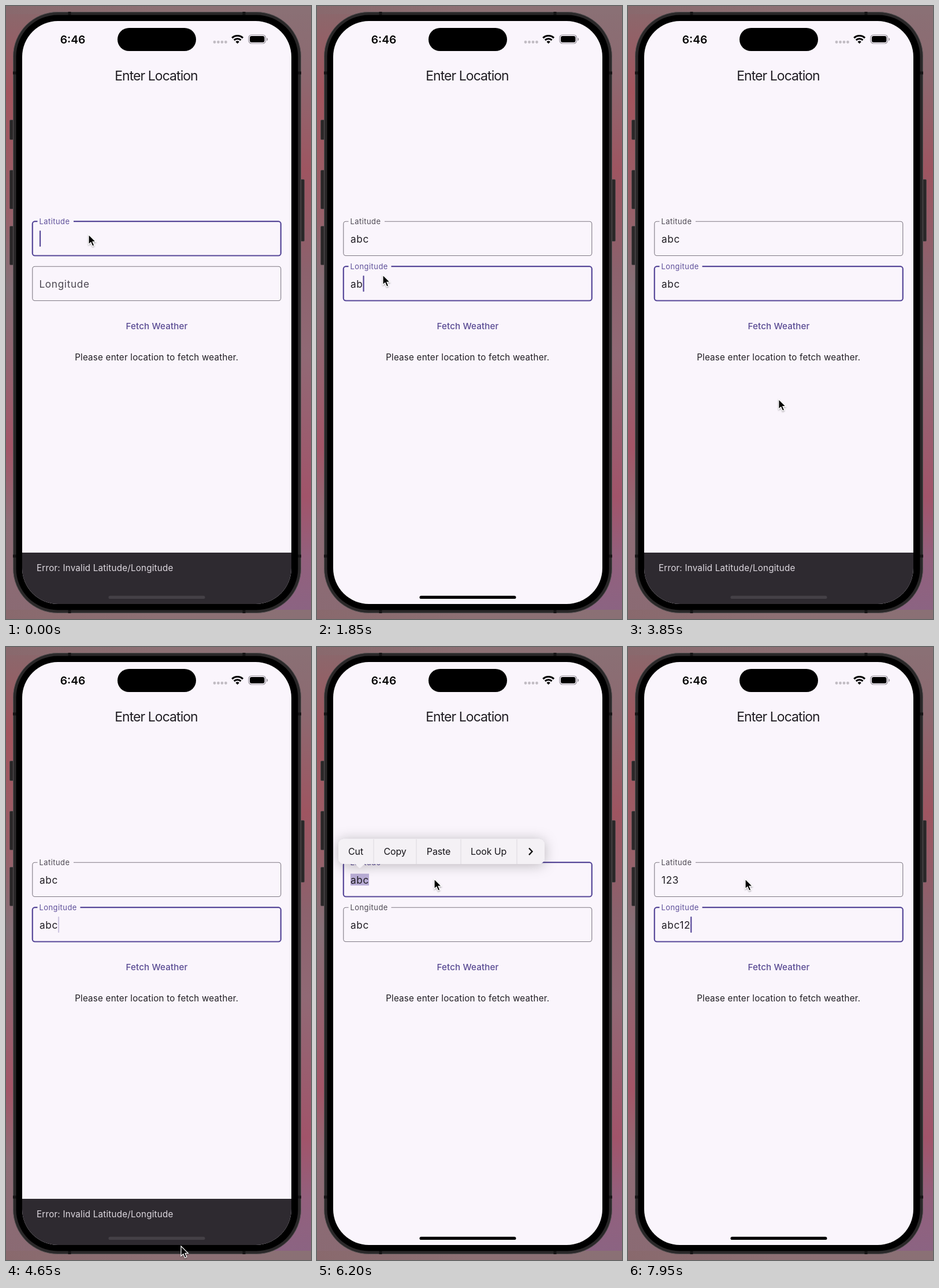
These frames come from a looping animation (528x1062 px, 8 s). An HTML page:

```html
<!DOCTYPE html>
<html lang="en">
<head>
<meta charset="utf-8">
<style>
  html, body { margin: 0; width: 100%; height: 100%; overflow: hidden; }
  svg { display: block; width: 528px; height: 1062px; }
  text { font: 15.2px Inter, "Open Sans", sans-serif; font-optical-sizing: none; letter-spacing: .2px; fill: #201d23; }
  .mid { text-anchor: middle; }
  .field text { font-size: 17.3px; letter-spacing: .6px; }
  #menu text { font-size: 16px; letter-spacing: -.15px; fill: #151318; text-anchor: middle; }
</style>
</head>
<body>
<svg viewBox="0 0 528 1062">
  <defs>
    <linearGradient id="wallLeft" x2="0" y2="1">
      <stop stop-color="#89696d"/><stop offset=".14" stop-color="#a2545d"/>
      <stop offset=".33" stop-color="#985f68"/><stop offset=".46" stop-color="#857077"/>
      <stop offset=".72" stop-color="#a35567"/><stop offset=".84" stop-color="#8e6d76"/>
      <stop offset="1" stop-color="#8a6a73"/>
    </linearGradient>
    <linearGradient id="wallRight" x2="0" y2="1">
      <stop stop-color="#8a7075"/><stop offset=".1" stop-color="#8c6a71"/>
      <stop offset=".27" stop-color="#9e5561"/><stop offset=".43" stop-color="#8c626d"/>
      <stop offset=".57" stop-color="#916975"/><stop offset=".8" stop-color="#a1546a"/>
      <stop offset=".9" stop-color="#93607d"/><stop offset="1" stop-color="#8a6483"/>
    </linearGradient>
    <linearGradient id="wallTop">
      <stop stop-color="#89696d"/><stop offset=".5" stop-color="#8d7074"/><stop offset="1" stop-color="#8a7075"/>
    </linearGradient>
    <clipPath id="screen"><rect x="28" y="26" width="466" height="1010" rx="62"/></clipPath>
    <filter id="menuShadow" x="-20%" y="-80%" width="140%" height="260%">
      <feDropShadow dx="0" dy="2" stdDeviation="11" flood-opacity=".26"/>
    </filter>
    <filter id="mouseShadow" x="-50%" y="-50%" width="200%" height="200%">
      <feDropShadow dx="0" dy="1.5" stdDeviation="1.2" flood-opacity=".35"/>
    </filter>
  </defs>

  <rect width="264" height="1062" fill="url(#wallLeft)"/>
  <rect x="264" width="264" height="1062" fill="url(#wallRight)"/>
  <rect width="528" height="14" fill="url(#wallTop)"/>
  <rect y="1046" width="528" height="16" fill="url(#wallTop)"/>

  <g fill="#2a2728" stroke="#4b4648" stroke-width=".8">
    <rect x="6.5" y="197.5" width="8" height="34" rx="1.5"/>
    <rect x="6.5" y="284.5" width="8" height="67" rx="1.5"/>
    <rect x="6.5" y="381.5" width="8" height="67" rx="1.5"/>
    <rect x="508" y="300.5" width="8.5" height="107" rx="1.5"/>
  </g>
  <rect x="12.5" y="10.5" width="498" height="1041" rx="77" fill="#2a2829" stroke="#565153"/>
  <path d="M12 116h6M505 116h6M12 953h6M505 953h6M110 10v6M412 10v6M110 1046v6M412 1046v6" stroke="#151415" stroke-width="5"/>
  <rect x="17.5" y="15.5" width="488" height="1031" rx="72"/>
  <rect x="28" y="26" width="466" height="1010" rx="62" fill="#faf5fc"/>

  <text class="mid" x="115.5" y="65" style="font-size:19.3px;font-weight:600;letter-spacing:0;fill:#000">6:46</text>
  <rect x="193" y="38" width="136" height="40" rx="20"/>
  <path d="M361 62.5h20" stroke="#c1bcc3" stroke-width="4.8" stroke-linecap="round" stroke-dasharray="0 6.5"/>
  <g fill="none" stroke="#000" stroke-width="3.1">
    <path d="M391.3 55.3a13.6 13.6 0 0 1 18.8 0M394.8 59.1a8.6 8.6 0 0 1 11.8 0"/>
    <path d="M400.7 65.2l-3.2-3.2a4.7 4.7 0 0 1 6.4 0z" fill="#000" stroke="none"/>
  </g>
  <rect x="420" y="50" width="29.5" height="15" rx="5" fill="none" stroke="#96919a" stroke-width="1.2"/>
  <rect x="422" y="52" width="25.5" height="11" rx="3.2"/>
  <path d="M451.3 55c2.6.7 2.6 4.7 0 5.4z" fill="#96919a"/>

  <text class="mid" x="260" y="129" style="font-size:23px;letter-spacing:-.95px">Enter Location</text>
  <g id="fields"></g>
  <rect id="hover" x="194" y="533" width="134" height="43" rx="21.5" fill="#e8dff2"/>
  <text class="mid" x="261" y="560" style="font-weight:500;letter-spacing:.1px;fill:#594a93">Fetch Weather</text>
  <text class="mid" x="260.7" y="614">Please enter location to fetch weather.</text>

  <g clip-path="url(#screen)">
    <g id="snack">
      <rect x="28" width="466" height="100" fill="#2e2a30"/>
      <text x="53" y="32" style="fill:#ded9e0">Error: Invalid Latitude/Longitude</text>
    </g>
  </g>
  <rect id="home" x="177.5" y="1021.7" width="167" height="5.4" rx="2.7"/>

  <g id="menu">
    <path filter="url(#menuShadow)" fill="#f4f1f5" d="M47 332.5H384a10 10 0 0 1 10 10V366a10 10 0 0 1-10 10H82l-8 7-8-7H47a10 10 0 0 1-10-10V342.500a10 10 0 0 1 10-10z"/>
    <path d="M98 333v43M172 333v43M249 333v43M346 333v43" stroke="#dcd8de"/>
    <text x="67" y="360">Cut</text><text x="135" y="360">Copy</text>
    <text x="210.500" y="360">Paste</text><text x="297" y="360">Look Up</text>
    <path d="M367 348.500l5.500 5.800-5.500 5.800" fill="none" stroke="#111" stroke-width="2.3"/>
  </g>
  <path id="mouse" filter="url(#mouseShadow)" d="M0 0V17L3.900 13.500 6.700 20 9.800 18.700 7 12.300H12.300Z" stroke="#fff" stroke-width="1.200"/>
</svg>

<script>
const LOOP = 8000, PURPLE = '#564798';
const $ = id => document.getElementById(id);
const clamp = v => Math.max(0, Math.min(1, v));
const smooth = v => v * v * (3 - 2 * v);
const quart = v => v < .5 ? 8 * v ** 4 : 1 - 8 * (1 - v) ** 4;
const ramp = (t, start, length) => clamp((t - start) / length);

// Last entry whose time has been reached
const latest = (steps, t) => steps.filter(s => s[0] <= t).pop();

const latText = [[0, ''], [900, 'a'], [1050, 'ab'], [1200, 'abc'], [6550, '1'], [6700, '12'], [6850, '123']];
const lonText = [[0, ''], [1750, 'a'], [1830, 'ab'], [2040, 'abc'], [7600, 'abc1'], [7800, 'abc12']];
const focusSteps = [[0, 0], [1600, 1], [5700, 0], [7300, 1]];
const caretResets = [...latText, ...lonText, ...focusSteps].map(s => [s[0]]).sort((a, b) => a[0] - b[0]);
const mousePath = [
  [0, 143, 396], [1350, 143, 396], [1700, 114, 466], [2300, 114, 466], [2900, 247, 567],
  [3600, 247, 567], [4350, 300, 1005], [4550, 302, 1024], [4650, 303, 1038], [4780, 304, 1052],
  [4900, 304, 1052], [5280, 213, 450], [5550, 203, 402], [8000, 203, 402]
];

function makeField(label, top, gap) {
  const g = document.createElementNS('http://www.w3.org/2000/svg', 'g');
  g.setAttribute('class', 'field');
  g.innerHTML = `
    <rect x="45.8" y="${top}" width="430" height="59.300" rx="4.300" fill="none"/>
    <rect x="54.500" y="${top - 3}" width="${gap}" height="6" fill="#faf5fc"/>
    <rect x="58" y="${top + 19.500}" height="20.500" fill="#b9add6"/>
    <text>${label}</text>
    <text x="58" y="${top + 36.300}"></text>
    <rect y="${top + 15.700}" width="2.200" height="28" rx="1" fill="${PURPLE}"/>`;
  $('fields').append(g);
  const [box, notch, selection, name, value, caret] = g.children;
  return (text, focused, float, selected, caretAlpha) => {
    box.setAttribute('stroke', focused ? PURPLE : '#7f7a84');
    box.setAttribute('stroke-width', focused ? 2.2 : 1.1);
    notch.setAttribute('opacity', float > .3 ? 1 : 0);
    name.style.fill = focused ? '#5d4e99' : '#4d4852';
    name.setAttribute('transform', `translate(57.5 ${top + 36.3 - 31.4 * float}) scale(${1 - .25 * float})`);
    value.textContent = text;
    const width = text ? value.getComputedTextLength() : 0;
    selection.setAttribute('width', selected ? width : 0);
    caret.setAttribute('x', 58 + width);
    caret.setAttribute('opacity', focused && !selected ? caretAlpha : 0);
  };
}
const drawLat = makeField('Latitude', 373.2, 62.5);
const drawLon = makeField('Longitude', 451.2, 74);

function mouseAt(t) {
  const i = Math.max(1, mousePath.findIndex(p => p[0] > t));
  const [t0, x0, y0] = mousePath[i - 1], [t1, x1, y1] = mousePath[i];
  const k = smooth((t - t0) / (t1 - t0));
  return [x0 + (x1 - x0) * k, y0 + (y1 - y0) * k];
}

// Visible height of the snackbar: timed exit, entry after the tap, then dragged off
function snackHeight(t) {
  if (t < 3000) return 89 * (1 - quart(ramp(t, 300, 250)));
  if (t < 4500) return 89 * quart(ramp(t, 3047, 250));
  return 89 - 9 * ramp(t, 4550, 100) - 80 * smooth(ramp(t, 4650, 200));
}

function blink(t) {
  const p = (t - latest(caretResets, t)[0]) % 1000;
  return 1 - ramp(p, 500, 150) + ramp(p, 850, 150);
}

function render(t) {
  const focus = latest(focusSteps, t)[1];
  const selected = t >= 5700 && t < 6550;
  const alpha = blink(t);
  drawLat(latest(latText, t)[1], focus === 0, 1, selected, alpha);
  drawLon(latest(lonText, t)[1], focus === 1, smooth(ramp(t, 1600, 167)), false, alpha);

  const [x, y] = mouseAt(t);
  $('mouse').setAttribute('transform', `translate(${x} ${y})`);
  const over = x > 194 && x < 328 && y > 533 && y < 576;
  $('hover').setAttribute('opacity', over ? 1 : 0);

  const height = snackHeight(t);
  $('snack').setAttribute('transform', `translate(0 ${1036 - height})`);
  $('home').setAttribute('fill', height > 14 ? '#444046' : '#000');
  $('menu').setAttribute('opacity', ramp(t, 5850, 150) * (1 - ramp(t, 6500, 100)));
}

function tick() {
  render(performance.now() % LOOP);
  requestAnimationFrame(tick);
}
tick();
</script>
</body>
</html>
```
